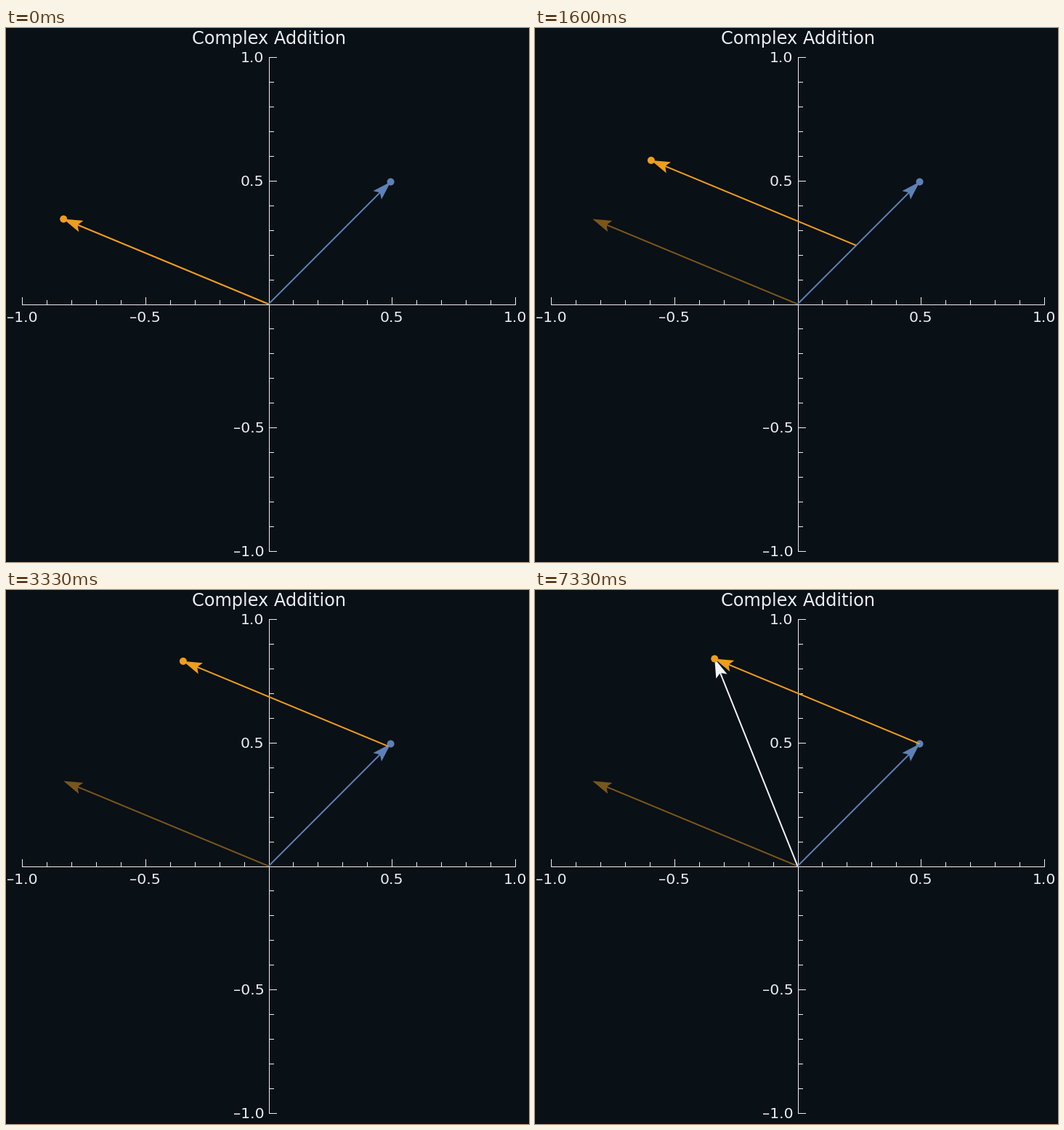
These frames come from a looping animation (720x734 px, 8 s). A matplotlib script:

```python
import math
import numpy as np
import matplotlib.pyplot as plt
from matplotlib.animation import FuncAnimation
from matplotlib.patches import Circle, Polygon

WIDTH, HEIGHT, DPI = 720, 734, 100
LOOP_MS, FRAMES, STAGE_FRAMES = 8000, 120, 50
ORIGIN, UNIT = np.array([361.5, 379.5]), 339.5

BACKGROUND, INK = "#091016", "#e9eef4"
BLUE, ORANGE = "#5e81b5", "#ee9d1e"


def polar(radius, angle):
    return complex(radius * math.cos(angle), radius * math.sin(angle))


FIRST = polar(0.7, math.pi / 4)
SECOND = polar(0.9, 7 * math.pi / 8)

plt.rcParams["font.family"] = "DejaVu Sans"
fig = plt.figure(figsize=(WIDTH / DPI, HEIGHT / DPI), dpi=DPI, facecolor=BACKGROUND)
ax = fig.add_axes([0, 0, 1, 1])
ax.set(xlim=(0, WIDTH), ylim=(HEIGHT, 0))
ax.axis("off")


def to_pixels(z):
    return ORIGIN + UNIT * np.array([z.real, -z.imag])


def arrow_outline(start, end, head=26, notch=21.5, half_head=8.2, half_shaft=1.0):
    """Corners of a thin shaft with a notched arrowhead."""
    tail, tip = to_pixels(start), to_pixels(end)
    along = (tip - tail) / np.hypot(*(tip - tail))
    side = np.array([-along[1], along[0]])
    neck, barb = tip - notch * along, tip - head * along
    return [tail + half_shaft * side, neck + half_shaft * side,
            barb + half_head * side, tip, barb - half_head * side,
            neck - half_shaft * side, tail - half_shaft * side]


def add_arrow(start, end, color, zorder, alpha=1.0):
    return ax.add_patch(Polygon(arrow_outline(start, end), facecolor=color,
                                linewidth=0, alpha=alpha, zorder=zorder))


def add_dot(z, color, zorder):
    return ax.add_patch(Circle(to_pixels(z), 5, facecolor=color, linewidth=0,
                               zorder=zorder))


def add_line(xs, ys):
    ax.plot(xs, ys, color=INK, linewidth=72 / DPI, zorder=1)


def add_text(x, y, text, pixels, align):
    ax.text(x, y, text, color=INK, fontsize=pixels * 72 / DPI, ha=align,
            va="baseline")


def draw_axes():
    ox, oy = ORIGIN
    add_line([ox - UNIT, ox + UNIT], [oy, oy])
    add_line([ox, ox], [oy - UNIT, oy + UNIT])
    for k in range(-10, 11):
        if k == 0:
            continue
        x, y = to_pixels(complex(k, k) / 10)
        size = 6 if k % 5 else 10
        add_line([x, x], [oy - size, oy])
        add_line([ox, ox + size], [y, y])
        if k % 5 == 0:
            label = f"{k / 10:.1f}".replace("-", "\u2013")
            add_text(x, 403.5, label, 20.4, "center")
            add_text(355.5, y + 7, label, 20.4, "right")
    add_text(361.5, 22, "Complex Addition", 24, "center")


draw_axes()
add_arrow(0j, SECOND, ORANGE, 2, alpha=0.5)
add_arrow(0j, FIRST, BLUE, 3)
add_dot(FIRST, BLUE, 4)
moving_arrow = add_arrow(0j, SECOND, ORANGE, 5)
sum_arrow = add_arrow(0j, FIRST + SECOND, "#f1f4f9", 6, alpha=0.0)
moving_dot = add_dot(SECOND, ORANGE, 7)


def update(frame):
    shift = FIRST * min(frame / STAGE_FRAMES, 1)
    moving_arrow.set_xy(arrow_outline(shift, shift + SECOND))
    moving_dot.center = to_pixels(shift + SECOND)
    sum_arrow.set_alpha(min(max(frame / STAGE_FRAMES - 1, 0), 1))
    return moving_arrow, moving_dot, sum_arrow


animation = FuncAnimation(fig, update, frames=FRAMES, interval=LOOP_MS / FRAMES,
                          repeat=True, repeat_delay=0)
plt.show()
```
